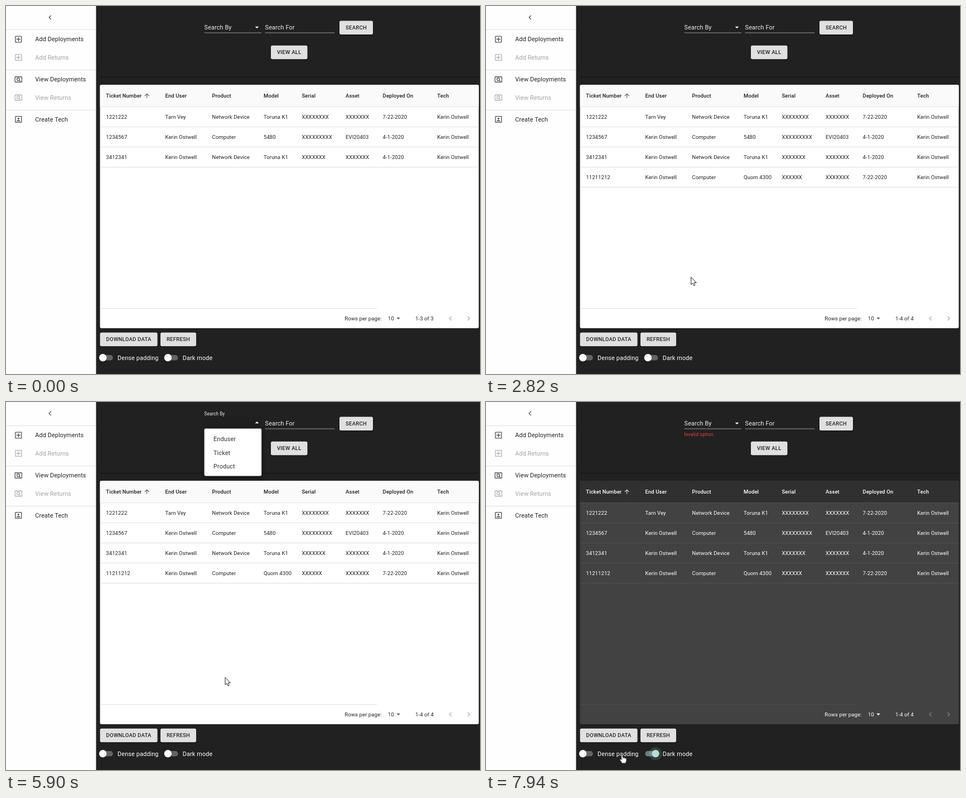
Recreate the animation shown at these times as an HTML page with a canvas. Size 850x659 px, loop 8000 ms.

```html
<!DOCTYPE html>
<html lang="en">
<head>
<meta charset="utf-8">
<title>Deployments</title>
<style>
  html, body { margin: 0; width: 100%; height: 100%; overflow: hidden; background: #212121; }
  canvas { display: block; }
</style>
</head>
<body>
<canvas id="stage" width="850" height="659"></canvas>
<script>
const ctx = document.getElementById('stage').getContext('2d');
const LOOP = 8000;
const SMALL = 9.51, BODY = 10.87, CAPTION = 8.15;

const BOX = 'M19 3H5c-1.1 0-2 .9-2 2v14c0 1.1.9 2 2 2h14c1.1 0 2-.9 2-2V5c0-1.1-.9-2-2-2zm0 16H5V5h14v14z';
const ICONS = {
  add: BOX + 'M11 17h2v-4h4v-2h-4V7h-2v4H7v2h4z',
  person: BOX + 'M12 12.25c1.24 0 2.25-1.01 2.25-2.25S13.24 7.75 12 7.75 9.75 8.76 9.75 10s1.01 2.25 2.25 2.25z' +
    'm4.5 4c0-1.5-3-2.25-4.5-2.25s-4.5.75-4.5 2.25V17h9v-.75z',
  view: 'M11.5 16c.88 0 1.7-.26 2.39-.7l2.44 2.44 1.42-1.42-2.44-2.43c.44-.7.7-1.51.7-2.39C16 9.01 13.99 7 11.5 7' +
    'S7 9.01 7 11.5 9.01 16 11.5 16zm0-7C12.88 9 14 10.12 14 11.5S12.88 14 11.5 14 9 12.88 9 11.5 10.12 9 11.5 9z' +
    'M20 4H4c-1.1 0-2 .9-2 2v12c0 1.1.9 2 2 2h16c1.1 0 2-.9 2-2V6c0-1.1-.9-2-2-2zm0 14H4V6h16v12z',
  left: 'M15.41 7.41L14 6l-6 6 6 6 1.41-1.41L10.83 12z',
  right: 'M10 6L8.59 7.41 13.17 12l-4.58 4.59L10 18l6-6z',
  down: 'M7 10l5 5 5-5z',
  up: 'M7 14l5-5 5 5z',
  sort: 'M4 12l1.41 1.41L11 7.83V20h2V7.83l5.58 5.59L20 12l-8-8-8 8z'
};
for (const name in ICONS) ICONS[name] = new Path2D(ICONS[name]);

const ARROW = new Path2D('M0 0V13.4L3 10.7L5 15.3L7.2 14.3L5.2 9.9H9.5Z');
const HAND = new Path2D('M-1.3 1Q0-1 1.3 1V5.5Q2.7 4.6 3.7 6Q5 5.2 6 6.6Q8 6 8 8V11.5Q7.6 13 6.8 14.2V16H-.8V14.4' +
  'L-4.2 10Q-4.6 8-2.6 8.7L-1.3 10Z');

const COLUMNS = [179.3, 285.5, 369.6, 462, 530.5, 609, 675.6, 773.3];
const HEAD = ['Ticket Number', 'End User', 'Product', 'Model', 'Serial', 'Asset', 'Deployed On', 'Tech'];
const TECH = 'Kerin Ostwell';
const NET = ['Network Device', 'Toruna K1'];
const ROWS = [
  ['1221222', 'Tarn Vey', ...NET, 'XXXXXXXX', 'XXXXXXX', '7-22-2020', TECH],
  ['1234567', TECH, 'Computer', '5480', 'XXXXXXXXX', 'EVI20403', '4-1-2020', TECH],
  ['3412341', TECH, ...NET, 'XXXXXXX', 'XXXXXXX', '4-1-2020', TECH],
  ['11211212', TECH, 'Computer', 'Quom 4300', 'XXXXXX', 'XXXXXXX', '7-22-2020', TECH]
];

// Pointer stops: time, x, y
const PATH = [
  [200, 718, 639], [980, 321, 598], [1140, 321, 597], [1420, 321, 597], [1680, 292, 588],
  [1900, 292, 588], [2180, 330, 420], [2420, 290, 480], [2670, 246, 575], [2820, 367, 486],
  [3130, 612, 340], [3440, 612, 340], [4210, 470, 200], [4640, 409, 45], [4960, 408, 44],
  [5040, 404, 64], [5900, 393, 493], [5980, 393, 495], [6740, 294, 626], [6980, 294, 626],
  [7220, 290, 629], [7780, 290, 629], [7940, 244, 631]
];
const TIMES = { hover: 820, unhover: 1560, refreshed: 1060, open: 4660, close: 6950, blur: 7610, dark: 7770 };

const clamp = v => Math.max(0, Math.min(1, v));
const ramp = (t, from, length) => clamp((t - from) / length);
const mix = (a, b, p) => a + (b - a) * p;
const easeOut = p => 1 - (1 - p) ** 3;

function text(str, x, y, size, color, { weight = 400, spacing = 0.01, align = 'left' } = {}) {
  ctx.font = `${weight} ${size}px Roboto, sans-serif`;
  ctx.letterSpacing = `${size * spacing}px`;
  ctx.textAlign = align;
  ctx.fillStyle = color;
  ctx.fillText(str, x, y + size * 0.355);
}

function rect(x, y, w, h, color, radius = 0) {
  ctx.fillStyle = color;
  ctx.beginPath();
  ctx.roundRect(x, y, w, h, radius);
  ctx.fill();
}

function disc(x, y, r, color) {
  ctx.fillStyle = color;
  ctx.beginPath();
  ctx.arc(x, y, r, 0, Math.PI * 2);
  ctx.fill();
}

function shadow(blur, offset, alpha) {
  ctx.shadowColor = `rgba(0,0,0,${alpha})`;
  ctx.shadowBlur = blur;
  ctx.shadowOffsetY = offset;
}

function icon(name, x, y, color, size = 16.3) {
  ctx.save();
  ctx.translate(x - size / 2, y - size / 2);
  ctx.scale(size / 24, size / 24);
  ctx.fillStyle = color;
  ctx.fill(ICONS[name], 'evenodd');
  ctx.restore();
}

function button(label, x, y, w, color = '#e0e0e0') {
  ctx.save();
  shadow(3, 1.5, 0.35);
  rect(x, y, w, 24.4, color, 2.7);
  ctx.restore();
  text(label, x + w / 2, y + 12, SMALL, '#212121', { weight: 500, spacing: 0.0286, align: 'center' });
}

function sidebar() {
  rect(0, 0, 161.5, 659, '#fefefe');
  icon('left', 79, 20.5, '#555');
  for (const y of [42, 114, 186]) rect(0, y, 161.5, 1, '#e0e0e0');
  const items = [
    ['add', 'Add Deployments', 59.5], ['add', 'Add Returns', 92, true],
    ['view', 'View Deployments', 131.5], ['view', 'View Returns', 164, true],
    ['person', 'Create Tech', 203]
  ];
  for (const [name, label, y, disabled] of items) {
    icon(name, 22.3, y, disabled ? '#b4b4b4' : '#555');
    text(label, 52.3, y, BODY, disabled ? '#a3a3a3' : '#222');
  }
}

function searchBar(t) {
  const open = t >= TIMES.open && t < TIMES.close;
  const shrink = t < TIMES.blur ? easeOut(ramp(t, TIMES.open, 200)) : 1 - ramp(t, TIMES.blur, 150);
  if (t >= TIMES.open && t < TIMES.blur) rect(356, 27, 102, 21, '#1f1f1f');
  text('Search By', 355.6, mix(37.8, 21, shrink), mix(BODY, CAPTION, shrink), '#ececec');
  rect(355.6, 47.5, 102.4, 1, '#999');
  icon(open ? 'up' : 'down', 450, open ? 37 : 38, '#fff');
  text('Search For', 464.6, 37.8, BODY, '#ececec');
  rect(464.6, 47.5, 124.6, 1, '#999');
  if (t >= TIMES.blur) text('Invalid option.', 355.6, 57.8, CAPTION, '#f44336', { spacing: 0.0333 });
  button('SEARCH', 598, 26.6, 60);
  button('VIEW ALL', 475, 70.8, 65.5);
  rect(168, 127, 680, 1, '#121212');
}

function table(dark, rowCount) {
  const ink = dark ? '#fff' : '#212121';
  const line = dark ? '#515151' : '#e0e0e0';
  rect(168.6, 141, 679.2, 436, dark ? '#424242' : '#fff', 2.7);
  rect(168.6, 141, 679.2, 39.5, dark ? '#303030' : '#fafafa', [2.7, 2.7, 0, 0]);
  HEAD.forEach((label, i) => text(label, COLUMNS[i], 160.7, SMALL, ink, { weight: 500 }));
  icon('sort', 252.6, 160.7, dark ? '#ddd' : '#555', 12.8);
  rect(168.6, 180, 679.2, 1, line);
  ROWS.slice(0, rowCount).forEach((row, r) => {
    row.forEach((cell, i) => text(cell, COLUMNS[i], 198.7 + r * 36, SMALL, ink));
    rect(168.6, 216 + r * 36, 679.2, 1, line);
  });
  rect(168.6, 541, 496.4, 1, dark ? '#4d4d4d' : '#e0e0e0');
  text('Rows per page:', 607.3, 559.7, SMALL, ink);
  text('10', 685, 559.2, SMALL, ink);
  icon('down', 703.6, 559.2, dark ? '#fff' : '#666');
  text(`1-${rowCount} of ${rowCount}`, 734, 559.7, SMALL, ink);
  const faint = dark ? '#7c7c7c' : '#b5b5b5';
  icon('left', 797, 559.5, faint);
  icon('right', 829.7, 559.5, faint);
}

function toggle(x, label, on = 0, halo = 0) {
  const y = 629.8;
  const thumb = x + 5 + on * 13.6;
  rect(x, y - 4.75, 23.1, 9.5, on > 0.5 ? '#6a807e' : '#646464', 4.75);
  if (halo) disc(thumb, y, 11.5, `rgba(${on > 0.5 ? '178,223,219' : '255,255,255'},${halo})`);
  ctx.save();
  shadow(2, 1, 0.4);
  disc(thumb, y, 6.8, on > 0.5 ? '#b2dfdb' : '#fafafa');
  ctx.restore();
  text(label, x + 31.4, y, BODY, '#fff');
}

function menu(t) {
  const alpha = ramp(t, TIMES.open, 220) * (1 - ramp(t, TIMES.close + 40, 230));
  if (!alpha) return;
  const grow = easeOut(ramp(t, TIMES.open, 220));
  ctx.save();
  ctx.globalAlpha = alpha;
  ctx.translate(407, 48);
  ctx.scale(mix(0.75, 1, grow), mix(0.56, 1, grow));
  ctx.translate(-407, -48);
  ctx.save();
  shadow(7, 3, 0.5);
  rect(355.6, 47.8, 102.6, 84.6, '#fff', 2.7);
  ctx.restore();
  ['Enduser', 'Ticket', 'Product'].forEach((label, i) => text(label, 372, 66.2 + i * 24.5, BODY, '#333'));
  ctx.restore();
}

function pointer(t) {
  if (t < PATH[0][0]) return;
  const next = PATH.findIndex(stop => stop[0] > t);
  const b = PATH[next < 0 ? PATH.length - 1 : next];
  const a = PATH[next < 0 ? PATH.length - 1 : next - 1];
  const p = b === a ? 0 : (t - a[0]) / (b[0] - a[0]);
  const hand = (t > TIMES.hover && t < TIMES.unhover) || t > 7150;
  const shape = hand ? HAND : ARROW;
  ctx.save();
  ctx.translate(mix(a[1], b[1], p), mix(a[2], b[2], p));
  ctx.lineJoin = 'round';
  ctx.lineWidth = 1;
  ctx.fillStyle = '#fff';
  ctx.strokeStyle = '#222';
  ctx.fill(shape);
  ctx.stroke(shape);
  if (hand) {
    ctx.lineWidth = 0.6;
    ctx.stroke(new Path2D('M1.3 5.5V8M3.7 6V8.4M6 6.6V8.8'));
  }
  ctx.restore();
}

function draw(t) {
  rect(0, 0, 850, 659, '#212121');
  sidebar();
  searchBar(t);
  table(t >= TIMES.dark, t < TIMES.refreshed ? 3 : 4);
  button('DOWNLOAD DATA', 168.6, 584.8, 103);
  const hovered = t > TIMES.hover && t < TIMES.unhover;
  button('REFRESH', 277, 584.8, 64, hovered ? '#d2d2d2' : '#e0e0e0');
  toggle(168.7, 'Dense padding');
  const halo = t > TIMES.dark ? 0.15 : 0.09 * ramp(t, 7150, 100);
  toggle(285.4, 'Dark mode', easeOut(ramp(t, TIMES.dark, 150)), halo);
  menu(t);
  pointer(t);
}

function tick() {
  draw(performance.now() % LOOP);
  requestAnimationFrame(tick);
}
tick();
</script>
</body>
</html>
```
